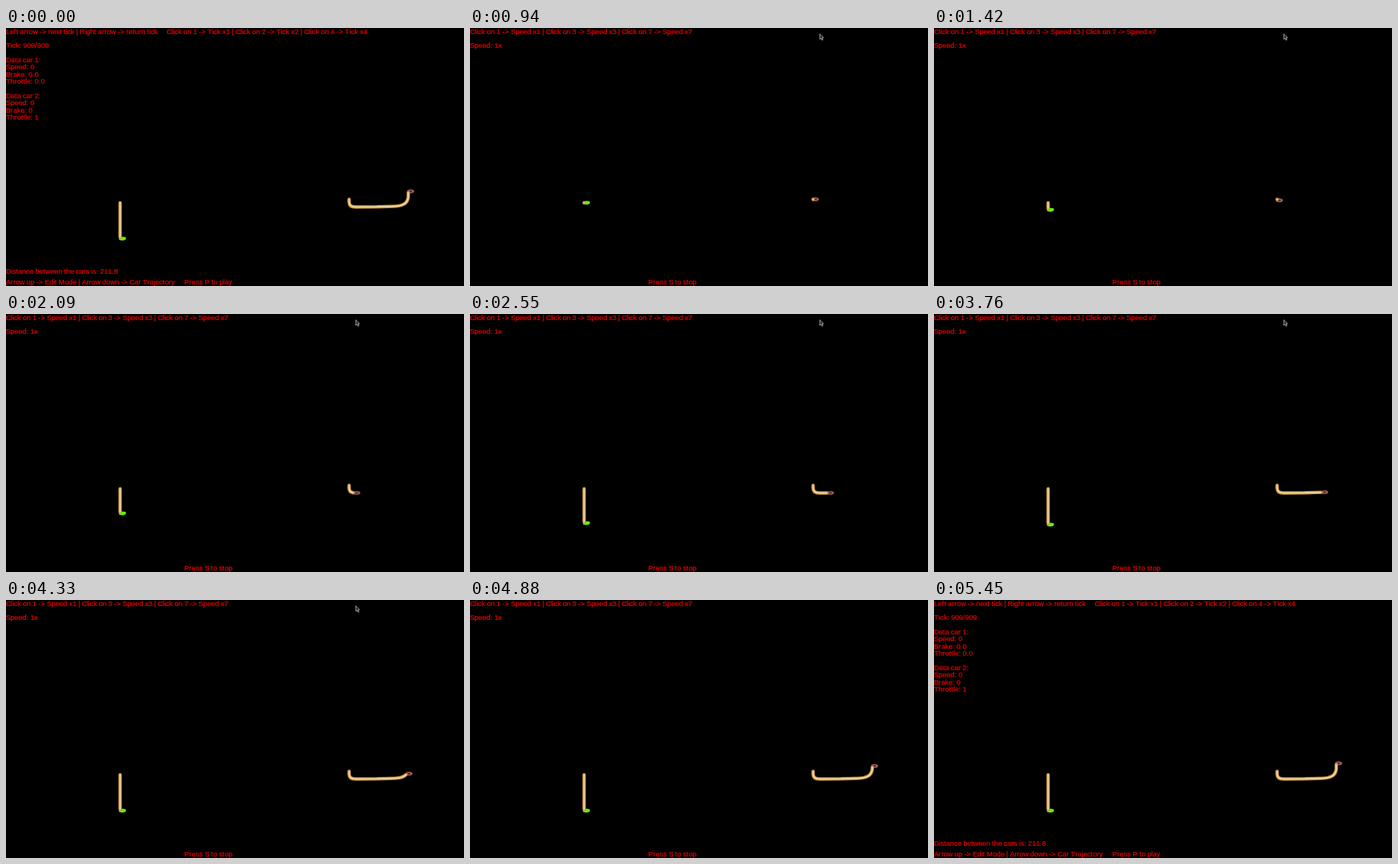
An HTML page for the animation above (5880 ms loop, 600x338 px).

```html
<!DOCTYPE html>
<html lang="en">
<head>
<meta charset="utf-8">
<title>Car replay</title>
<style>
html, body { margin: 0; width: 100%; height: 100%; overflow: hidden; background: #000; }
svg { display: block; width: 100vw; height: 100vh; }
text { font: 20px "Liberation Sans", Arial, sans-serif; fill: #e60000; stroke: #e60000; stroke-width: .5; }
.trail path { fill: none; stroke-linecap: round; stroke-linejoin: round; }
.edge { stroke: #cc9a4c; stroke-width: 4.4; }
.core { stroke: #f6e0aa; stroke-width: 1.5; }
</style>
</head>
<body>
<svg viewBox="0 0 600 338" preserveAspectRatio="none">
  <rect width="600" height="338" fill="#000"/>
  <g id="car1">
    <path d="M-4.5 -1.2Q-2 -2.6 1 -2.4L4 -1.9Q5.2 -.6 4.6 .6Q3.4 2.4 0 2.5Q-4 2.4 -4.6 1Z" fill="#66ee00"/>
  </g>
  <g id="car2">
    <path d="M-4.4 -1.6L-2 -2.5H2L3.6 -1.7L5 -.4L3.6 1.9L1 2.4H-3L-4.4 1.4Z" fill="#8c4a45"/>
    <path d="M-1 -1H1.4V.8H-1Z" fill="#3a2023"/>
    <path d="M-.6 -2.2H1V-1.3H-.6ZM2 -1H3.6V.4H2ZM-.2 1.2H1.6V2H-.2Z" fill="#bb7a7c"/>
  </g>
  <g id="trail1" class="trail"></g>
  <g id="trail2" class="trail"></g>
  <g id="review" transform="scale(.46875)"></g>
  <g id="play" transform="scale(.46875)"></g>
  <path id="cursor" d="M0 0V7.2L1.7 5.7L2.9 8.4L4.1 7.9L2.9 5.3H5.1Z"
    fill="#222" stroke="#bbb" stroke-width=".8" stroke-linejoin="round"/>
</svg>
<script>
const LOOP = 5880, PLAY = 940, STOP = 5450;
const LEAD = 2; // how far a car runs ahead of its trail
const NS = "http://www.w3.org/2000/svg";
const $ = id => document.getElementById(id);
const pen = document.createElement("canvas").getContext("2d");
pen.font = '20px "Liberation Sans", Arial, sans-serif';

function add(parent, tag, attrs) {
  const el = document.createElementNS(NS, tag);
  for (const key in attrs) el.setAttribute(key, attrs[key]);
  return parent.appendChild(el);
}

// Glyphs advance by whole pixels on a 1280-pixel-wide screen.
const HINTED = { " ": 5, T: 13, P: 14 };

function label(group, x, y, str) {
  const xs = [];
  for (const ch of str) {
    xs.push(x);
    x += HINTED[ch] || Math.round(pen.measureText(ch).width);
  }
  add(group, "text", { x: xs.join(" "), y: y + 16 }).textContent = str;
}

const review = $("review"), play = $("play");
label(review, 0, 0, "Left arrow -> next tick | Right arrow -> return tick");
label(review, 449, 0, "Click on 1 -> Tick x1 | Click on 2 -> Tick x2 | Click on 4 -> Tick x4");
label(review, 0, 40, "Tick: 909/909");
["Data car 1:", "Speed: 0", "Brake: 0.0", "Throttle: 0.0", "",
 "Data car 2:", "Speed: 0", "Brake: 0", "Throttle: 1"]
  .forEach((str, i) => label(review, 0, 80 + 20 * i, str));
label(review, 0, 671, "Distance between the cars is: 211.8");
label(review, 0, 701, "Arrow up -> Edit Mode | Arrow down -> Car Trajectory");
label(review, 498, 701, "Press P to play");
label(play, 0, 0, "Click on 1 -> Speed x1 | Click on 3 -> Speed x3 | Click on 7 -> Speed x7");
label(play, 0, 40, "Speed: 1x");
label(play, 498, 701, "Press S to stop");

// keys: [time in ms, distance driven]
function makeCar(id, d, keys) {
  const paths = ["edge", "core"].map(c => add($("trail" + id), "path", { class: c, d }));
  return { el: $("car" + id), paths, keys, total: paths[0].getTotalLength() };
}

const cars = [
  makeCar(1, "M149.5 229V276",
    [[940, 0], [1150, 3], [1420, 9.2], [2090, 32.2], [2550, 45], [2790, 47]]),
  makeCar(2, "M449.5 224.5V228C449.5 233 453 234.5 458 234.5L486 234.3L509 233.6C520 233.3 526.5 230 527 221V214",
    [[940, 0], [1420, 1.3], [1700, 5], [2090, 14.3], [2730, 32], [3330, 51],
     [3760, 66.5], [3940, 73], [4330, 84.5], [4750, 93], [5150, 99]])
];

function lerpKeys(keys, t) {
  if (t <= keys[0][0]) return keys[0][1];
  for (let i = 1; i < keys.length; i++) {
    const [t0, a] = keys[i - 1], [t1, b] = keys[i];
    if (t < t1) return a + (b - a) * (t - t0) / (t1 - t0);
  }
  return keys[keys.length - 1][1];
}

function show(el, on) { el.setAttribute("visibility", on ? "visible" : "hidden"); }

function draw(t) {
  const playing = t >= PLAY && t < STOP;
  show(play, playing);
  show(review, !playing);
  for (const car of cars) {
    const len = playing ? Math.min(car.total, lerpKeys(car.keys, t)) : car.total;
    const p = car.paths[0].getPointAtLength(len);
    car.el.setAttribute("transform", `translate(${p.x + 3} ${p.y})`);
    for (const path of car.paths)
      path.setAttribute("stroke-dasharray", `${Math.max(len - LEAD, .01)} 200`);
  }
  const [cx, cy] = t < 150 ? [455, -2] : t < 240 ? [457, 4] : [458.2, 7.6];
  $("cursor").setAttribute("transform", `translate(${cx} ${cy})`);
  show($("cursor"), t >= 90 && t < 4450);
}

const start = performance.now();
function tick() {
  draw((performance.now() - start) % LOOP);
  requestAnimationFrame(tick);
}
tick();
</script>
</body>
</html>
```
